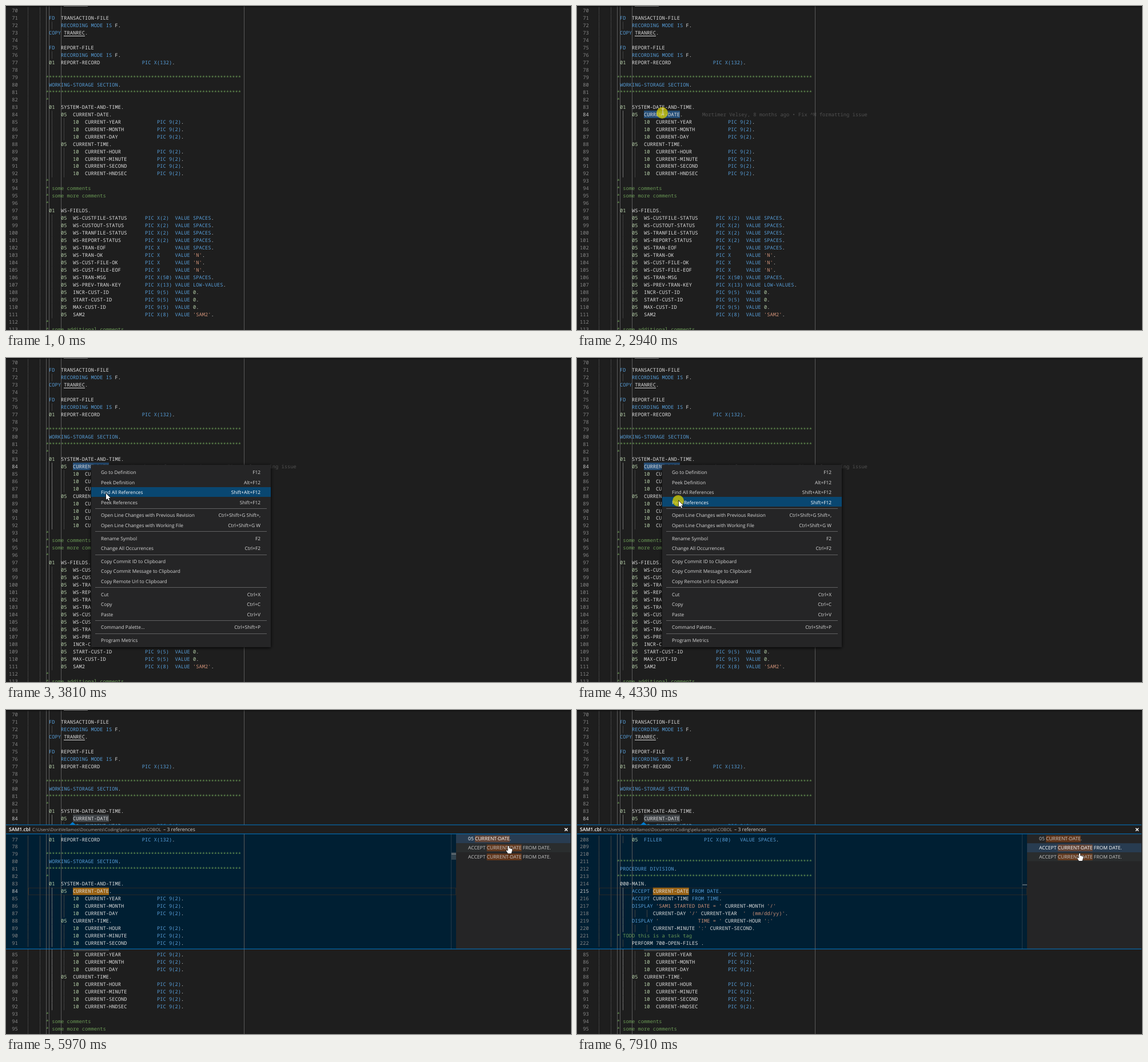
An HTML page with a canvas that plays this animation: 988 px wide and 567 px high, repeating every 8000 ms.

```html
<!DOCTYPE html>
<html lang="en">
<head>
<meta charset="utf-8">
<title>Peek references</title>
<style>
html, body { margin: 0; width: 100%; height: 100%; overflow: hidden; background: #1e1e1e; }
canvas { display: block; }
</style>
</head>
<body>
<canvas id="stage" width="988" height="567"></canvas>
<script>
const ctx = document.getElementById('stage').getContext('2d');
const W = 988, H = 567, LOOP = 8000;
const CHAR = 5.25, LINE = 12.975, LEFT = 38.25;
const MONO = '500 8.75px "Noto Sans Mono", monospace';
const ui = (size, weight = 500) => `${weight} ${size}px "Open Sans", sans-serif`;
const C = {
  bg: '#1e1e1e', peek: '#001f33', panel: '#252526', accent: '#007acc',
  text: '#dcdcdc', keyword: '#569cd6', number: '#b5cea8', string: '#ce9178', comment: '#6a9955',
  lineNo: '#858585', lineNoActive: '#c6c6c6', guide: '#404040', guideActive: '#707070', ruler: '#5a5a5a'
};
const KEYWORDS = new Set(('FD RECORDING MODE IS COPY PIC WORKING-STORAGE SECTION VALUE SPACES LOW-VALUES ' +
  'PROCEDURE DIVISION ACCEPT FROM DATE TIME DISPLAY FILLER').split(' '));
const STARS = '*'.repeat(65);

// Source text starts at column 6.
const mainCode = `
 FD  TRANSACTION-FILE
     RECORDING MODE IS F.
 COPY TRANREC.

 FD  REPORT-FILE
     RECORDING MODE IS F.
 01  REPORT-RECORD              PIC X(132).

${STARS}
 WORKING-STORAGE SECTION.
${STARS}
*
 01  SYSTEM-DATE-AND-TIME.
     05  CURRENT-DATE.
         10  CURRENT-YEAR            PIC 9(2).
         10  CURRENT-MONTH           PIC 9(2).
         10  CURRENT-DAY             PIC 9(2).
     05  CURRENT-TIME.
         10  CURRENT-HOUR            PIC 9(2).
         10  CURRENT-MINUTE          PIC 9(2).
         10  CURRENT-SECOND          PIC 9(2).
         10  CURRENT-HNDSEC          PIC 9(2).
*
* some comments
* some more comments
*
 01  WS-FIELDS.
     05  WS-CUSTFILE-STATUS      PIC X(2)  VALUE SPACES.
     05  WS-CUSTOUT-STATUS       PIC X(2)  VALUE SPACES.
     05  WS-TRANFILE-STATUS      PIC X(2)  VALUE SPACES.
     05  WS-REPORT-STATUS        PIC X(2)  VALUE SPACES.
     05  WS-TRAN-EOF             PIC X     VALUE SPACES.
     05  WS-TRAN-OK              PIC X     VALUE 'N'.
     05  WS-CUST-FILE-OK         PIC X     VALUE 'N'.
     05  WS-CUST-FILE-EOF        PIC X     VALUE 'N'.
     05  WS-TRAN-MSG             PIC X(50) VALUE SPACES.
     05  WS-PREV-TRAN-KEY        PIC X(13) VALUE LOW-VALUES.
     05  INCR-CUST-ID            PIC 9(5)  VALUE 0.
     05  START-CUST-ID           PIC 9(5)  VALUE 0.
     05  MAX-CUST-ID             PIC 9(5)  VALUE 0.
     05  SAM2                    PIC X(8)  VALUE 'SAM2'.
*
* some additional comments`.split('\n');

const usageCode = `     05  FILLER              PIC X(80)   VALUE SPACES.


${STARS}
 PROCEDURE DIVISION.
${STARS}
 000-MAIN.
     ACCEPT CURRENT-DATE FROM DATE.
     ACCEPT CURRENT-TIME FROM TIME.
     DISPLAY 'SAM1 STARTED DATE = ' CURRENT-MONTH '/'
            CURRENT-DAY '/' CURRENT-YEAR  '  (mm/dd/yy)'.
     DISPLAY '             TIME = ' CURRENT-HOUR ':'
            CURRENT-MINUTE ':' CURRENT-SECOND.
* TODO this is a task tag
     PERFORM 700-OPEN-FILES .`.split('\n');

// Groups are divided by separators.
const menuGroups = [
  ['Go to Definition|F12', 'Peek Definition|Alt+F12', 'Find All References|Shift+Alt+F12', 'Peek References|Shift+F12'],
  ['Open Line Changes with Previous Revision|Ctrl+Shift+G Shift+,', 'Open Line Changes with Working File|Ctrl+Shift+G W'],
  ['Rename Symbol|F2', 'Change All Occurrences|Ctrl+F2'],
  ['Copy Commit ID to Clipboard|', 'Copy Commit Message to Clipboard|', 'Copy Remote Url to Clipboard|'],
  ['Cut|Ctrl+X', 'Copy|Ctrl+C', 'Paste|Ctrl+V'],
  ['Command Palette...|Ctrl+Shift+P'],
  ['Program Metrics|']
];

// Pointer moves: start, end, steps, from x, y, to x, y
const moves = [
  [840, 1460, 9, 911, 564, 168, 216],
  [1530, 1610, 2, 168, 216, 154, 194],
  [1690, 1760, 2, 154, 194, 150, 185],
  [3510, 3810, 5, 150, 186, 175, 237],
  [3890, 4100, 4, 175, 237, 178, 250],
  [5190, 5970, 11, 178, 250, 879, 238],
  [7680, 7910, 4, 879, 238, 879, 251]
];
const clicks = [[1930, 2010, 149, 187], [2090, 2240, 149, 187], [2940, 3110, 149, 187],
  [4250, 4350, 177, 250], [6650, 6800, 878.5, 236.5]];

const within = (t, a, b) => t >= a && t < b;
const colX = col => LEFT + col * CHAR;

function rect(x, y, w, h, color) {
  ctx.fillStyle = color;
  ctx.fillRect(x, y, w, h);
}

function label(text, x, y, color, font, align = 'left') {
  ctx.font = font;
  ctx.fillStyle = color;
  ctx.textAlign = align;
  ctx.fillText(text, x, y + 3);
}

function clipped(x, y, w, h, draw) {
  ctx.save();
  ctx.beginPath();
  ctx.rect(x, y, w, h);
  ctx.clip();
  draw();
  ctx.restore();
}

function shape(points, fill, stroke) {
  ctx.beginPath();
  points.forEach(([x, y]) => ctx.lineTo(x, y));
  ctx.closePath();
  if (stroke) {
    ctx.strokeStyle = stroke;
    ctx.lineWidth = 1.4;
    ctx.stroke();
  }
  ctx.fillStyle = fill;
  ctx.fill();
}

function tokenColor(token) {
  if (token[0] === "'") return C.string;
  if (/^\d+$/.test(token)) return C.number;
  return KEYWORDS.has(token) || /^[X9](\(\d+\))?$/.test(token) ? C.keyword : C.text;
}

function codeLine(text, y) {
  if (text[0] === '*') return label(text, colX(6), y, C.comment, MONO);
  for (const m of text.matchAll(/'[^']*'|[\w()-]+|\./g))
    label(m[0], colX(6 + m.index), y, tokenColor(m[0]), MONO);
}

// mark: { line, col, color }; scope: line range of the bright indent guide
function editor(lines, first, top, { active, scope = [0, -1], mark }) {
  const yOf = n => top + (n - first) * LINE;
  lines.forEach((text, i) => {
    const n = first + i, y = yOf(n), indent = 6 + Math.max(0, text.search(/\S/));
    for (let col = 0; col < indent; col += 4) {
      const bright = col === 8 && n >= scope[0] && n <= scope[1];
      rect(Math.round(colX(col)), y - LINE / 2, 1, LINE, bright ? C.guideActive : C.guide);
    }
  });
  for (const col of [6, 7, 11, 72]) rect(Math.round(colX(col)), 0, 1, H, C.ruler);
  if (mark) rect(colX(mark.col), yOf(mark.line) - 6.5, 12 * CHAR, LINE, mark.color);
  lines.forEach((text, i) => {
    const n = first + i, y = yOf(n);
    label(n, 20.7, y, n === active ? C.lineNoActive : C.lineNo, MONO, 'right');
    codeLine(text, y);
  });
}

function mainEditor(t, shift) {
  const focused = t >= 2010;
  const selected = t >= 2160 && { line: 84, col: 15, color: t < 4420 ? '#264f78' : '#3f4347' };
  editor(mainCode, 70, 8 + shift, { active: focused && 84, scope: focused ? [84, 92] : undefined, mark: selected });
  rect(101, shift, 42, 1, C.text);
  rect(101, 52 + shift, 37, 1, C.text);
  if (within(t, 2240, 4520))
    label('Mortimer Velsey, 8 months ago • Fix ^M formatting issue', 219, 189.7 + shift, '#505050', MONO);
  if (within(t, 2010, 2620)) rect(180, 183 + shift, 1, 13, '#aeafad');
}

function resultRow(i, t, pointer) {
  const y = 217.4 + i * 15.8, mid = y + 8, selected = i === (t < 6800 ? 0 : 1);
  const hovered = pointer.x > 787 && pointer.y >= y - 1 && pointer.y < y + 14.8;
  if (selected || hovered) rect(787, y, 200, 15.8, selected ? '#283c51' : '#2a2d2e');
  const [before, after] = i ? ['ACCEPT ', ' FROM DATE.'] : ['05 ', '.'];
  const color = selected ? '#ffffff' : '#c4c4c4', font = ui(8.55), name = 'CURRENT-DATE';
  ctx.font = font;
  const x = 808 + ctx.measureText(before).width, w = ctx.measureText(name).width;
  rect(x, mid - 5.8, w, 11.8, 'rgba(234,92,0,.3)');
  label(before, 808, mid, color, font);
  label(name, x, mid, color, font);
  label(after, x + w, mid, color, font);
}

function peekView(t, pointer) {
  const jumped = t >= 6800;
  shape([[111, 201], [116.5, 196], [122, 201]], C.accent);
  rect(0, 201, 987, 217, C.bg);
  label('SAM1.cbl', 5, 209.3, '#ffffff', ui(8.6, 600));
  label('C:\\Users\\DoritVellamos\\Documents\\Coding\\pelu-sample\\COBOL', 46, 209.3, '#a8a8a8', ui(7.5, 400));
  label('– 3 references', 275, 209.3, '#d4d4d4', ui(8.55));
  ctx.strokeStyle = '#ffffff';
  ctx.lineWidth = 1.5;
  ctx.beginPath();
  for (const d of [-2.5, 2.5]) {
    ctx.moveTo(979.5 - d, 206.7);
    ctx.lineTo(979.5 + d, 211.7);
  }
  ctx.stroke();

  clipped(0, 217, 787, 201, () => {
    rect(0, 217, 787, 201, C.peek);
    ctx.strokeStyle = '#282828';
    ctx.lineWidth = 1;
    ctx.strokeRect(39.5, 311.5, 747, 12);
    const color = '#996214';
    if (jumped) editor(usageCode, 208, 226.5, { active: 215, scope: [215, 220], mark: { line: 215, col: 18, color } });
    else editor(mainCode.slice(7, 22), 77, 226.5, { active: 84, scope: [84, 92], mark: { line: 84, col: 15, color } });
    rect(778, 217, 1, 201, 'rgba(127,127,127,.3)');
    if (within(t, 4580, 6270)) rect(779, 249, 8, 13, 'rgba(121,121,121,.4)');
    rect(779, jumped ? 305.5 : 251.5, 8, 1, '#a0a0a0');
  });
  rect(787, 217, 200, 201, C.panel);
  for (let i = 0; i < 3; i++) resultRow(i, t, pointer);
  for (const y of [200.5, 216.3, 417.7]) rect(0, y, 987, 1, C.accent);
}

function contextMenu(pointer) {
  ctx.save();
  ctx.shadowColor = '#000000';
  ctx.shadowBlur = 6;
  ctx.shadowOffsetY = 1;
  rect(149, 187, 314, 319, C.panel);
  ctx.restore();
  let y = 199.7;
  menuGroups.forEach((group, g) => {
    if (g) {
      rect(156, Math.round(y - 6.5), 300, 1, '#606061');
      y += 5.25;
    }
    for (const item of group) {
      const [name, keys] = item.split('|');
      const hovered = Math.abs(pointer.y - y) < 8.75;
      if (hovered) rect(149, Math.round(y - 8.75), 314, 17, '#094771');
      const color = hovered ? '#ffffff' : '#d8d8d8';
      label(name, 166, y + .3, color, ui(8.35));
      label(keys, 445, y + .3, color, ui(8.35), 'right');
      y += 17.5;
    }
  });
}

function pointerAt(t) {
  const move = moves.filter(m => t >= m[0]).pop();
  if (!move) return { x: -50, y: -50 };
  const [start, end, steps, x0, y0, x1, y1] = move;
  const step = Math.floor((t - start) / (end - start) * (steps - 1) + 1e-6) + 1;
  const p = Math.min(1, step / steps), e = p * p * (3 - 2 * p);
  return { x: x0 + (x1 - x0) * e, y: y0 + (y1 - y0) * e };
}

function drawPointer({ x, y }, menuOpen, peekOpen) {
  const placed = points => points.map(([dx, dy]) => [x + dx, y + dy]);
  if (menuOpen) {
    shape(placed([[0, 0], [0, 11], [2.5, 8.7], [4.3, 12.5], [6, 11.7], [4.3, 8], [7.7, 8]]), '#ffffff', '#111111');
  } else if (peekOpen && x > 787) {
    shape(placed([[-1, 0], [.8, 0], [1, 4], [5.8, 5.2], [6.4, 6.4], [5.5, 10], [4.5, 13],
      [-1.2, 13], [-4.2, 8.5], [-3.6, 7.2], [-1.2, 8.5]]), '#ffffff', '#222222');
  } else {
    ctx.strokeStyle = '#d8d8d8';
    ctx.lineWidth = 1;
    ctx.beginPath();
    for (const s of [-1, 1]) {
      ctx.moveTo(x - 2.5, y + 5 * s);
      ctx.lineTo(x + 2.5, y + 5 * s);
    }
    ctx.moveTo(x, y - 5);
    ctx.lineTo(x, y + 5);
    ctx.stroke();
  }
}

function render(t) {
  const pointer = pointerAt(t), menuOpen = within(t, 3010, 4350), peekOpen = t >= 4420;
  ctx.textRendering = 'geometricPrecision';
  rect(0, 0, W, H, C.bg);
  if (peekOpen) {
    clipped(0, 0, W, 201, () => mainEditor(t, 0));
    clipped(0, 418, W, 149, () => mainEditor(t, 225.5));
    peekView(t, pointer);
  } else {
    mainEditor(t, 0);
  }
  const shadow = ctx.createLinearGradient(0, 0, 0, 3);
  shadow.addColorStop(0, 'rgba(0,0,0,.6)');
  shadow.addColorStop(1, 'rgba(0,0,0,0)');
  rect(0, 0, W, 3, shadow);
  if (menuOpen) contextMenu(pointer);
  for (const [from, to, x, y] of clicks) {
    if (!within(t, from, to)) continue;
    ctx.fillStyle = 'rgba(215,205,0,.75)';
    ctx.beginPath();
    ctx.arc(x, y, 10, 0, Math.PI * 2);
    ctx.fill();
  }
  drawPointer(pointer, menuOpen, peekOpen);
}

const began = performance.now();
function tick() {
  render((performance.now() - began) % LOOP);
  requestAnimationFrame(tick);
}
tick();
</script>
</body>
</html>
```
